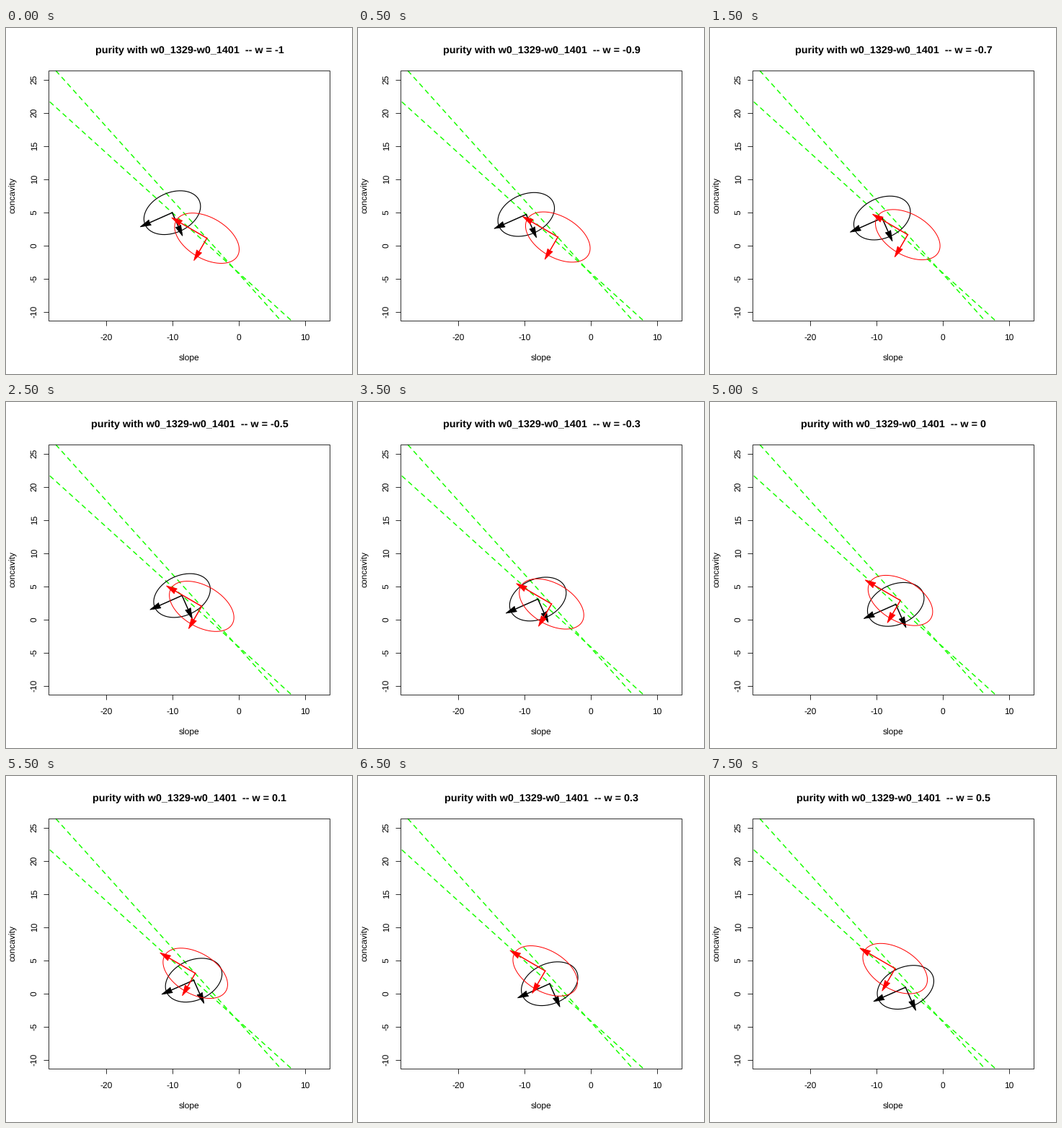
Animation of 480x480 px, one loop 8000 ms. Source, as a matplotlib script:

```python
import numpy as np
import matplotlib.pyplot as plt
from matplotlib.animation import FuncAnimation
from matplotlib.patches import Polygon, Rectangle

plt.rcParams["font.family"] = "Liberation Sans"
plt.rcParams["text.hinting"] = "none"

SIZE, DPI = 480, 72          # at 72 dpi one point is one pixel
STEPS, STEP_MS = 16, 500
LEFT, TOP, RIGHT, BOTTOM = 59.5, 59.5, 449.5, 406.5
UNIT = 9.19                  # pixels per data unit on both axes
X0, Y0 = 323.2, 302.2        # pixel position of the data origin
FRAME_LW = 0.8
HEAD_LEN, HEAD_HALF = 14.6, 3.9

fig = plt.figure(figsize=(SIZE / DPI, SIZE / DPI), dpi=DPI, facecolor="white")
ax = fig.add_axes([0, 0, 1, 1])
ax.set_xlim(0, SIZE)
ax.set_ylim(SIZE, 0)
ax.axis("off")


def label(x, y, text, size=12, **kw):
    return ax.text(x, y, text, size=size, ha="center", va="baseline",
                   rotation_mode="anchor", **kw)


def tick(xs, ys):
    ax.plot(xs, ys, color="black", lw=FRAME_LW, solid_capstyle="butt",
            snap=False, zorder=3)


def draw_axes():
    ax.add_patch(Rectangle((LEFT, TOP), RIGHT - LEFT, BOTTOM - TOP, fill=False,
                           ec="black", lw=FRAME_LW, snap=False, zorder=3))
    for v in range(-20, 11, 10):
        x = np.floor(X0 + v * UNIT) + 0.5
        tick([x, x], [BOTTOM, BOTTOM + 7])
        label(x - 0.5, 433, str(v))
    for v in range(-10, 26, 5):
        y = np.floor(Y0 - v * UNIT) + 0.5
        tick([LEFT - 7, LEFT], [y, y])
        label(42.5, y - 1, str(v), rotation=90)
    label(254.5, 462, "slope")
    label(13.5, 232, "concavity", rotation=90)


def draw_guides():
    for xs, ys in (([69.4, 381.8], [TOP, BOTTOM]),
                   ([61.2, 396.6], [102.8, BOTTOM])):
        ax.plot(xs, ys, color="#18ff00", lw=1.5, dashes=(4, 4),
                dash_capstyle="round", zorder=2)


# Arrowhead along +x, centred on the end of its shaft
HEAD = np.array([(HEAD_LEN / 2, 0),
                 (-HEAD_LEN / 2, HEAD_HALF),
                 (-HEAD_LEN / 2 + 0.8, 0),
                 (-HEAD_LEN / 2, -HEAD_HALF)])


class Ellipse:
    """Ellipse with an arrow along each principal axis."""

    def __init__(self, color, start, drift, axis, a, b, lw, z):
        self.start, self.drift = np.array(start), np.array(drift)
        u = np.array(axis) / np.hypot(*axis)
        v = np.array([u[1], -u[0]])
        t = np.linspace(0, 2 * np.pi, 200)[:, None]
        outline = a * np.cos(t) * u + b * np.sin(t) * v
        self.lines = [(self.line(color, lw, z), outline)]
        self.heads = []
        for d, length in ((u, a), (v, b)):
            shaft = np.array([[0, 0], d * length])
            self.lines.append((self.line(color, 1.5, z + 0.1), shaft))
            normal = np.array([-d[1], d[0]])
            shape = d * length + HEAD @ np.array([d, normal])
            patch = Polygon(shape, fc=color, ec=color, lw=0.9,
                            joinstyle="round", zorder=z + 0.2)
            ax.add_patch(patch)
            self.heads.append((patch, shape))

    @staticmethod
    def line(color, lw, z):
        return ax.plot([], [], color=color, lw=lw, zorder=z)[0]

    def move(self, step):
        c = self.start + step * self.drift
        for line, pts in self.lines:
            line.set_data(*(pts + c).T)
        for patch, pts in self.heads:
            patch.set_xy(pts + c)


draw_axes()
draw_guides()
title = label(254.5, 35.5, "", size=14.4, weight="bold")
ellipses = [
    Ellipse("black", (230.6, 256.2), (2.71, 2.46), (-44.5, 19.7),
            41.1, 27.8, 1.15, 4),
    Ellipse("red", (278.7, 291.6), (-1.46, -1.63), (-49, -28.5),
            49.1, 28.5, 1, 5),
]


def update(step):
    w = (step - 10) / 10
    title.set_text(f"purity with w0_1329-w0_1401  -- w = {w:g}")
    for e in ellipses:
        e.move(step)
    return []


anim = FuncAnimation(fig, update, frames=STEPS, interval=STEP_MS,
                     repeat=True, repeat_delay=0, blit=False)
plt.show()
```
